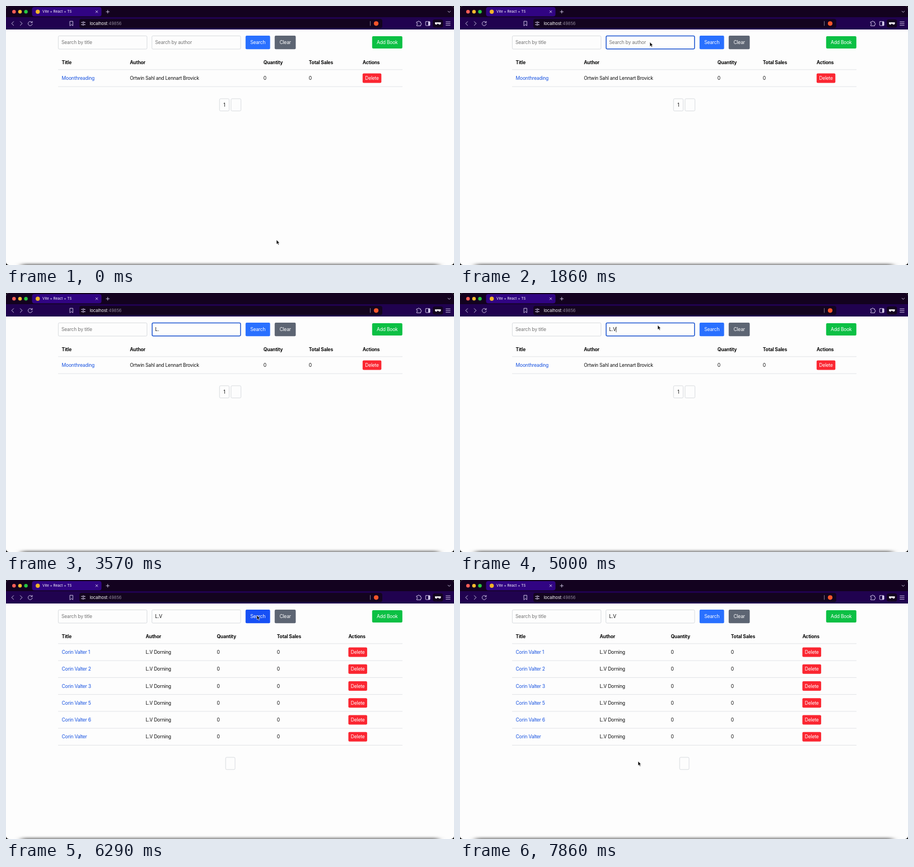
An HTML page that plays this animation: 800 px wide and 463 px high, repeating every 8000 ms.

```html
<!DOCTYPE html>
<html lang="en">
<head>
<meta charset="utf-8">
<title>Book list</title>
<style>
  html, body { margin: 0; height: 100%; overflow: hidden; background: #000; }
  svg { display: block; width: 800px; height: 463px; }
  text { font: 8.47px Inter, "Liberation Sans", sans-serif; letter-spacing: -.02em; fill: #0a0a0a; white-space: pre; }
  .mid { text-anchor: middle; }
  .head { font-weight: 700; }
  .link { fill: #1450e0; }
  .white { fill: #fff; }
  .hint { fill: #757575; }
  .tab { font-size: 6.35px; letter-spacing: 0; fill: #fff; }
  .url { font-size: 7.45px; letter-spacing: 0; fill: #fff; }
  .box { fill: #fdfdfd; stroke: #d0d3d8; stroke-width: .8; }
  .icon { fill: none; stroke: #d9cfee; stroke-width: .9; stroke-linecap: round; stroke-linejoin: round; }
</style>
</head>
<body>
<svg viewBox="0 0 800 463">
  <defs>
    <clipPath id="win"><rect width="800" height="463" rx="5"/></clipPath>
    <filter id="soft" x="-5%" y="-200%" width="110%" height="500%"><feGaussianBlur stdDeviation="6 2.2"/></filter>
  </defs>
  <g clip-path="url(#win)">
    <rect width="800" height="463" fill="#fdfdfd"/>
    <rect x="28" y="461" width="744" height="9" fill="#777" filter="url(#soft)"/>

    <!-- browser frame -->
    <rect width="800" height="21" fill="#13021f"/>
    <rect y="20" width="800" height="22" fill="#20024f"/>
    <rect x="46.5" y="2" width="124" height="16.5" rx="4" fill="#310483"/>
    <circle cx="14.3" cy="10.3" r="3.2" fill="#ff5f57"/>
    <circle cx="25" cy="10.3" r="3.2" fill="#febc2e"/>
    <circle cx="35.6" cy="10.3" r="3.2" fill="#28c840"/>
    <circle cx="56.7" cy="10.3" r="3.7" fill="#f0b429"/>
    <text class="tab" x="65" y="12.4">Vite + React + TS</text>
    <rect x="131" y="23" width="541" height="16.5" rx="4" fill="#13041f"/>
    <rect x="762" y="24" width="18.5" height="14.5" rx="4" fill="#13041f"/>
    <g class="icon">
      <path d="M160.2 8.4l3.6 3.6m0-3.6l-3.6 3.6M179 10.3h5.4m-2.7-2.7v5.4M789.2 9.2l2.2 2.2 2.2-2.2"/>
      <path d="M13.6 27.8l-3.5 3.5 3.5 3.5M25.4 27.8l3.5 3.5-3.5 3.5"/>
      <path d="M46.2 29a3.8 3.8 0 1 0 .8 3.2M47 27.4v2.4h-2.4"/>
      <path d="M114.4 27.3h5v8l-2.5-2.1-2.5 2.1z"/>
      <path d="M134.4 29.3h2m3.6 0h1.6M134.4 33.3h1.6m3.6 0h2"/>
      <circle cx="138.2" cy="29.3" r="1.3"/><circle cx="137.8" cy="33.3" r="1.3"/>
      <path d="M650.5 27.5v7.5" stroke="#8b8496"/>
      <path d="M733.5 28.5h2a1.5 1.5 0 0 1 3 0h2v2.2a1.4 1.4 0 0 1 0 2.8v2h-7v-2a1.4 1.4 0 0 0 0-2.8z"/>
      <rect x="749.3" y="27.8" width="7.8" height="7.2" rx=".8"/>
      <path d="M785.6 28.4h7.6m-7.6 3h7.6m-7.6 3h7.6"/>
    </g>
    <path d="M754 28h3v7h-3z" fill="#d9cfee"/>
    <path d="M766 29.2h10.6v1.6a2.4 2.4 0 0 1-4.7.8h-1.2a2.4 2.4 0 0 1-4.7-.8z" fill="#fff"/>
    <text class="url" x="149.5" y="34">localhost<tspan fill="#91899c">:49856</tspan></text>
    <circle cx="661" cy="31.3" r="4.1" fill="#f5552b"/>

    <!-- search bar -->
    <rect class="box" x="93.4" y="53.4" width="158.4" height="23.6" rx="2"/>
    <text class="hint" x="99" y="68.4">Search by title</text>
    <rect class="box" x="260.6" y="53.4" width="158.4" height="23.6" rx="2"/>
    <rect id="ring" x="261" y="53.6" width="157.8" height="23.2" rx="2" fill="none" stroke="#2059d4" stroke-width="1.5"/>
    <text id="field" x="266.3" y="68.4"></text>
    <path id="caret" stroke="#111" stroke-width=".7"/>
    <rect id="search" x="427.8" y="53" width="43.8" height="24.3" rx="2"/>
    <text class="mid white" x="449.7" y="68.4">Search</text>
    <rect x="479.8" y="53" width="37.6" height="24.3" rx="2" fill="#5d6573"/>
    <text class="mid white" x="498.6" y="68.4">Clear</text>
    <rect x="653.8" y="54" width="54" height="22" rx="2" fill="#0cc044"/>
    <text class="mid white" x="680.8" y="68.4">Add Book</text>

    <g id="before"></g>
    <g id="after"></g>

    <path id="mouse" d="M0 0v7.9l1.8-1.6 1.3 2.8 1.4-.6-1.3-2.8h2.4z" fill="#000" stroke="#fff" stroke-width=".6"/>
  </g>
</svg>
<script>
const $ = id => document.getElementById(id);
const show = (el, on) => el.style.display = on ? '' : 'none';

const label = (x, y, s, cls = '') => `<text class="${cls}" x="${x}" y="${y}">${s}</text>`;
const rule = y => `<path d="M93 ${y}H708" stroke="#dfe1e5" stroke-width=".9"/>`;
const page = (x, y, w) => `<rect class="box" x="${x}" y="${y}" width="${w}" height="21.8" rx="2"/>`;

function table(cols, books) {
  const heads = ['Title', 'Author', 'Quantity', 'Total Sales', 'Actions'];
  let out = heads.map((h, i) => label(cols[i], 104, h, 'head')).join('') + rule(113.8);
  books.forEach(([title, author], i) => {
    const y = 132.1 + i * 30.25;
    out += label(cols[0], y, title, 'link') + label(cols[1], y, author)
      + label(cols[2], y, 0) + label(cols[3], y, 0)
      + `<rect x="${cols[4]}" y="${y - 11.6}" width="33.5" height="17" rx="2" fill="#fb2631"/>`
      + label(cols[4] + 16.75, y, 'Delete', 'mid white') + rule(y + 12);
  });
  return out;
}

$('before').innerHTML = table([99.5, 221.2, 459.8, 540.8, 636.8],
    [['Moonthreading', 'Ortwin Sahl and Lennart Brovick']])
  + page(381.3, 165.8, 17.2) + page(401.8, 165.8, 17.8) + label(390, 180, 1, 'mid');
$('after').innerHTML = table([99.5, 249.4, 376.4, 483.8, 611.4],
    [' 1', ' 2', ' 3', ' 5', ' 6', ''].map(n => ['Corin Valter' + n, 'L.V Dorning']))
  + page(392.2, 317, 16.8);

const LOOP = 8000, STEP = 1000 / 7;
const FOCUS = 1285, CLICK = 5710, RESULT = 5850;
const keys = [[2857, 'L'], [3070, 'L.'], [4710, 'L.V']];
// time, x, y of the pointer tip
const path = [
  [0, 483, 418], [140, 483, 418], [142, 372, 160], [286, 372, 160], [715, 339, 64.5],
  [4710, 339, 64.5], [4998, 353, 57.5], [5140, 353, 57.5], [5570, 448, 63],
  [6570, 448, 63], [7285, 318, 324], [LOOP, 318, 324]
];

function pointer(t) {
  const i = path.findIndex(p => p[0] > t);
  const [t0, x0, y0] = path[i - 1], [t1, x1, y1] = path[i];
  const u = (t - t0) / (t1 - t0), e = u * u * (3 - 2 * u);
  return [x0 + (x1 - x0) * e, y0 + (y1 - y0) * e];
}

function draw(now) {
  const t = Math.floor((now % LOOP) / STEP + .02) * STEP;
  const typed = keys.filter(k => k[0] <= t + 1).pop();
  const focused = t >= FOCUS && t < CLICK;
  const blink = (t - (typed ? typed[0] : FOCUS)) % 1000 < 500;

  const field = $('field');
  field.textContent = typed ? typed[1] : 'Search by author';
  field.setAttribute('class', typed ? '' : 'hint');
  show($('ring'), focused);
  show($('caret'), focused && blink);
  const x = 266.4 + (typed ? field.getComputedTextLength() : 0);
  $('caret').setAttribute('d', `M${x} 60.4v9.8`);

  const [mx, my] = pointer(t);
  $('mouse').setAttribute('transform', `translate(${mx} ${my})`);
  show($('mouse'), t < 2850 || t > 4710);
  const hover = mx > 428 && mx < 471 && my > 53 && my < 77;
  $('search').setAttribute('fill', hover ? '#1750f5' : '#2970ff');

  show($('before'), t < RESULT);
  show($('after'), t >= RESULT);
}

const start = performance.now();
(function tick() {
  draw(performance.now() - start);
  requestAnimationFrame(tick);
})();
</script>
</body>
</html>
```
